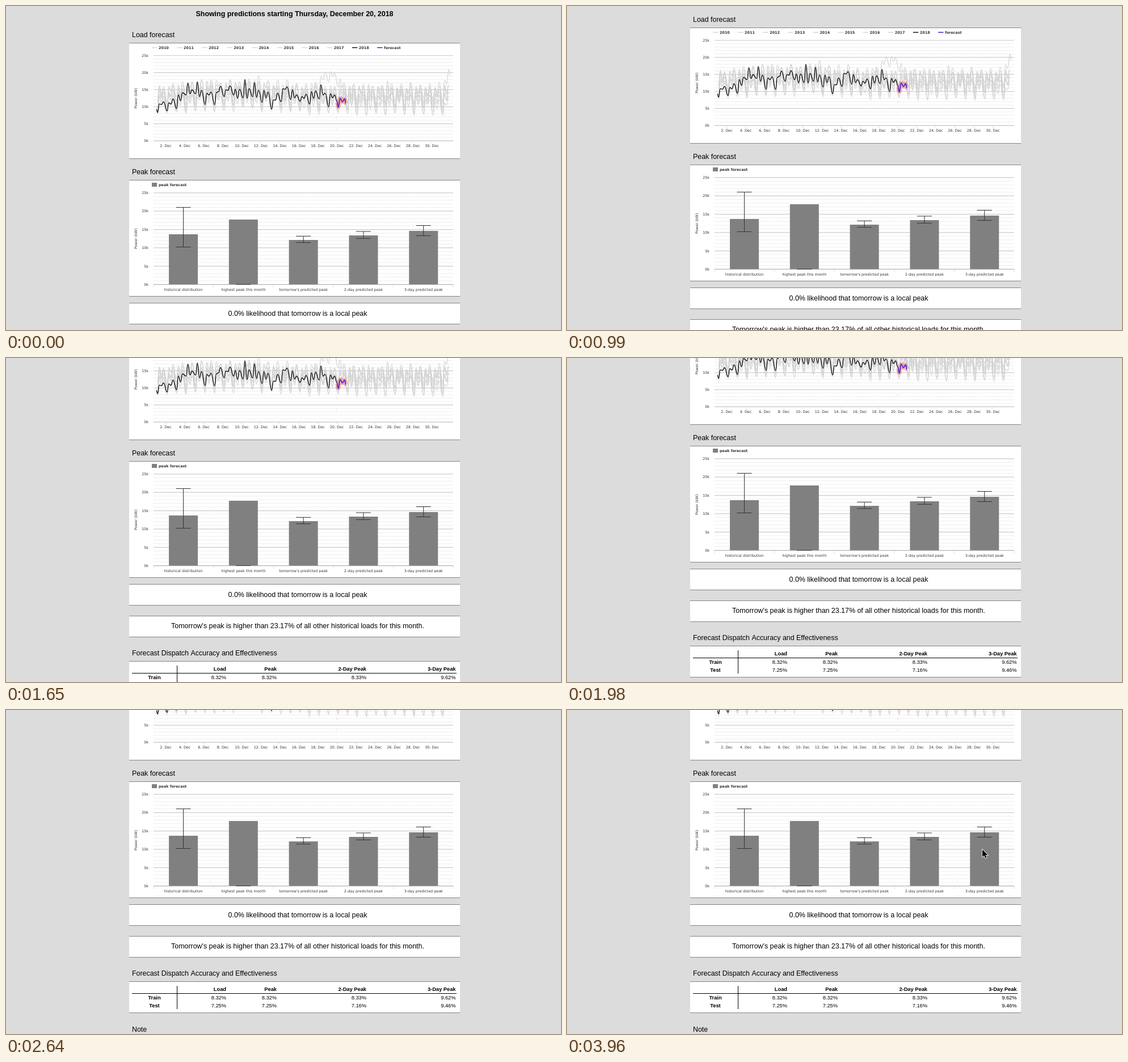
An HTML page with a canvas for the animation above (4.29 s loop, 978 by 572 pixels).

```html
<!DOCTYPE html>
<html lang="en">
<head>
<meta charset="utf-8">
<title>Load and peak forecast</title>
<style>
html, body { margin: 0; width: 978px; height: 572px; overflow: hidden; background: #dcdcdc; }
canvas { display: block; }
</style>
</head>
<body>
<canvas id="stage" width="978" height="572"></canvas>
<script>
const STEP = 330, LOOP = 4290;
const SCROLL = [0, 0, 13, 27, 80, 125, 152, 172, 181];
const SANS = '"Liberation Sans", Arial, sans-serif';
const CHART = '"DejaVu Sans", Verdana, sans-serif';
const LEFT = 260, RIGHT = 788, DAY0 = 264.8, DAY = 16.75;
const PHASES = [0.14, 0.32, 0.55, 0.76];
const GREY = '#d3d3d3', BLUE = '#2a12d6';

const stage = document.getElementById('stage').getContext('2d');
const page = document.createElement('canvas');
page.width = 978;
page.height = 760;
const g = page.getContext('2d');

// y is the middle of the capital letters
function text(str, x, y, size, { align = 'left', bold = false, font = SANS, color = '#000' } = {}) {
  g.font = `${bold ? 'bold ' : ''}${size}px ${font}`;
  g.textAlign = align;
  g.fillStyle = color;
  g.fillText(str, x, y + size * 0.36);
}

const label = (str, x, y, options) =>
  text(str, x, y, 6.4, { font: CHART, color: '#333', ...options });

function line(x1, y1, x2, y2, color, width = 1, dash = []) {
  g.strokeStyle = color;
  g.lineWidth = width;
  g.setLineDash(dash);
  g.beginPath();
  g.moveTo(x1, y1);
  g.lineTo(x2, y2);
  g.stroke();
  g.setLineDash([]);
}

function panel(top, bottom) {
  g.fillStyle = '#fff';
  g.fillRect(217, top, 583, bottom - top);
  g.fillStyle = '#858585';
  g.fillRect(217, top, 583, 1);
  g.fillRect(217, bottom - 1, 583, 1);
}

function axes(top, bottom) {
  for (let k = 0; k <= 25; k++) {
    const y = bottom - (bottom - top) * k / 25;
    if (k % 5) {
      line(LEFT, y, RIGHT, y, '#dedede', 0.8, [2, 1]);
    } else {
      line(LEFT, y, RIGHT, y, k ? '#cbcbcb' : '#b4b4b4', 1.2);
      label(k + 'k', 251, y, { align: 'right' });
    }
  }
  g.save();
  g.translate(228.5, (top + bottom) / 2);
  g.rotate(-Math.PI / 2);
  label('Power (kW)', 0, 0, { align: 'center' });
  g.restore();
}

// Smooth curve that is level at every point
function wave(points, color, width) {
  g.strokeStyle = color;
  g.lineWidth = width;
  g.lineJoin = 'round';
  g.beginPath();
  points.forEach(([x, y], i) => {
    if (!i) return g.moveTo(x, y);
    const [px, py] = points[i - 1], mid = (px + x) / 2;
    g.bezierCurveTo(mid, py, mid, y, x, y);
  });
  g.stroke();
}

const quarterX = i => DAY0 + DAY * (Math.floor(i / 4) + PHASES[i % 4]);

let seed = 11;
function random() {
  seed = (seed * 16807) % 2147483647;
  return seed / 2147483647;
}

const bump = (d, center, width) => Math.exp(-(((d - center) / width) ** 2));

function pastYear(k) {
  const shape = [16, -9, 1, -12], base = 172 - k * 2.9, points = [];
  for (let i = 0; i < 124; i++) {
    const d = i / 4;
    let y = base + shape[i % 4] * (0.8 + random() * 0.5) + (random() - 0.5) * 9;
    y += Math.sin(d * 0.9 + k * 2) * 5 - 8 * bump(d, 8, 5);
    if (k === 7) y = y * (1 - bump(d, 18.2, 1.2)) + bump(d, 18.2, 1.2) * (122 + shape[i % 4] * 0.7);
    if (k === 6) y -= 30 * bump(d, 30.8, 0.7);
    points.push([quarterX(i), Math.max(111, Math.min(y, 193))]);
  }
  if (k === 6) points.push([780, 112], [783, 123]);
  wave(points, GREY, 1.2);
}

function loadChart() {
  panel(65, 270);
  axes(87.5, 238);
  for (let i = 0; i < 10; i++) {
    const x = 257 + i * 44.1, color = i < 8 ? GREY : i === 8 ? '#000' : BLUE;
    line(x, 73.5, x + 9.5, 73.5, color, 1.4);
    label(i < 9 ? 2010 + i : 'forecast', x + 12, 73.3, { bold: true });
  }
  for (let d = 1; d <= 30; d += 2) {
    const x = DAY0 + d * DAY;
    line(x, 238, x, 242, '#dcdcdc');
    label(d < 30 ? `${d + 1}. Dec` : '1. Jan', x, 246.8, { align: 'center' });
  }
  for (let k = 0; k < 8; k++) pastYear(k);
  line(583, 194, 583, 199, '#e4e4e4');
  line(582, 215, 582, 219, '#e4e4e4');

  const current = [
    188, 173, 174, 169, 185, 171, 173, 164, 181, 157, 167, 153,
    157, 136, 155, 148, 155, 134, 160, 149, 174, 154, 157, 152,
    174, 153, 151, 142, 160, 148, 149, 141, 157, 147, 163, 147,
    162, 130, 163, 146, 160, 135, 161, 149, 170, 149, 162, 152,
    182, 166, 166, 154, 169, 146, 147, 143, 165, 148, 162, 157,
    168, 160, 163, 156, 173, 151, 163, 150, 164, 139, 157, 154,
    178, 155, 162, 157
  ];
  const now = [583, 168];
  wave([[DAY0, 182], ...current.map((y, i) => [quarterX(i), y]), now], '#111', 1.4);

  const forecast = [now, [585.5, 178.5], [588.8, 163], [593, 169], [596.6, 164], [599, 172]];
  wave(forecast, 'rgba(240,120,120,.6)', 7);
  wave(forecast, BLUE, 1.5);
}

function peakChart() {
  const bars = [
    ['historical distribution', 403, 355.5, 425.5],
    ['highest peak this month', 377, 491.5, 491.5],
    ["tomorrow's predicted peak", 413, 406.3, 417.7],
    ['2-day predicted peak', 405, 398, 410.3],
    ['3-day predicted peak', 397, 387.5, 405.5]
  ];
  panel(307, 513);
  axes(329.8, 491.7);
  g.fillStyle = '#808080';
  g.fillRect(257, 312, 9, 7);
  label('peak forecast', 269, 315.5, { bold: true });
  for (let i = 0; i <= 5; i++) {
    const x = LEFT + i * 105.6;
    line(x, 492, x, 497, '#dcdcdc');
  }
  bars.forEach(([name, top, high, low], i) => {
    const x = 312.5 + i * 105.8;
    g.fillStyle = '#808080';
    g.fillRect(x - 25.5, top, 51, 491.5 - top);
    line(x, high, x, low, '#333');
    for (const y of [high, low]) line(x - 13, y, x + 13, y, '#333');
    label(name, x, 500.5, { align: 'center' });
  });
}

function table() {
  const columns = [388, 477, 635, 792.5];
  const rows = [
    ['', 'Load', 'Peak', '2-Day Peak', '3-Day Peak'],
    ['Train', '8.32%', '8.32%', '8.33%', '9.62%'],
    ['Test', '7.25%', '7.25%', '7.16%', '9.46%']
  ];
  panel(660, 716);
  line(222, 681.5, 794, 681.5, '#000');
  line(301.5, 668, 301.5, 709, '#000');
  rows.forEach(([name, ...cells], r) => {
    const y = [673.5, 688.5, 702.5][r];
    text(name, 261.5, y, 9.31, { align: 'center', bold: true });
    cells.forEach((cell, c) => text(cell, columns[c], y, 9.31, { align: 'right', bold: !r }));
  });
}

function drawPage() {
  g.fillStyle = '#dcdcdc';
  g.fillRect(0, 0, 978, 760);
  const size = 12.42, center = { align: 'center' };
  text('Showing predictions starting Thursday, December 20, 2018', 508.5, 14, size, { ...center, bold: true });
  text('Load forecast', 222, 51, size);
  loadChart();
  text('Peak forecast', 222, 293, size);
  peakChart();
  panel(524, 562);
  text('0.0% likelihood that tomorrow is a local peak', 514, 542.5, size, center);
  panel(580, 618);
  text("Tomorrow's peak is higher than 23.17% of all other historical loads for this month.", 514, 597.5, size, center);
  text('Forecast Dispatch Accuracy and Effectiveness', 222, 646, size);
  table();
  text('Note', 222, 745, size);
}

function cursor(x, y) {
  const arrow = new Path2D('M0 0V13L3 10.3L5.3 15L7.5 14L5.3 9.5H9.5Z');
  stage.save();
  stage.translate(x, y);
  stage.strokeStyle = '#fff';
  stage.lineWidth = 1.6;
  stage.stroke(arrow);
  stage.fillStyle = '#000';
  stage.fill(arrow);
  stage.restore();
}

function frame(time) {
  const step = Math.floor((time % LOOP) / STEP);
  stage.drawImage(page, 0, -SCROLL[Math.min(step, SCROLL.length - 1)]);
  if (step === 11) cursor(741, 237);
  if (step === 12) cursor(732, 246.5);
  requestAnimationFrame(frame);
}

drawPage();
requestAnimationFrame(frame);
</script>
</body>
</html>
```
